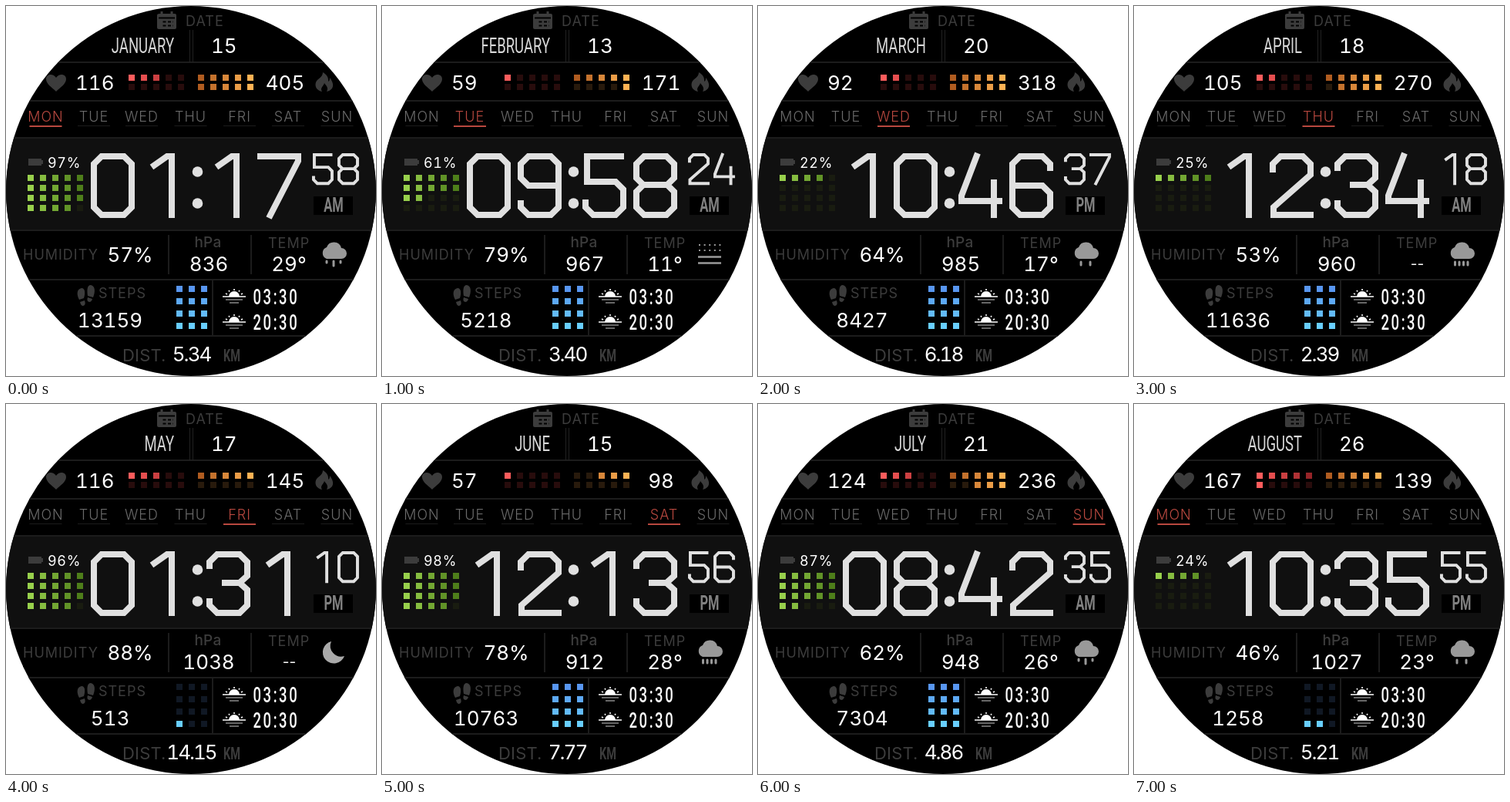
Animation of 480 by 480 pixels, one loop 8000 ms. Source, as an HTML page:

```html
<!DOCTYPE html>
<html lang="en">
<head>
<meta charset="utf-8">
<title>Watch face</title>
<style>
html, body { margin: 0; width: 100%; height: 100%; overflow: hidden; background: #fff; }
svg { display: block; width: 480px; height: 480px; }
text { font-family: Inter, "Open Sans", sans-serif; }
.num { font-size: 26px; fill: #fff; font-feature-settings: "tnum"; }
.mid { text-anchor: middle; }
.dist { letter-spacing: -2px; }
.small { font-size: 18px; letter-spacing: .7px; }
.none { font-size: 19px; font-feature-settings: normal; }
.label { font-size: 18px; letter-spacing: 1px; fill: #3c3c3c; }
.day { fill: #6a6a6a; font-weight: 300; }
.narrow { font-family: Roboto, sans-serif; font-size: 28px; fill: #d8d8d8; }
.end { text-anchor: end; }
.clock { letter-spacing: 3.9px; font-weight: 500; fill: #fff; }
.unit { font-weight: 700; }
.digit { fill: none; stroke: #e0e0e0; stroke-width: 8; stroke-linejoin: miter; }
</style>
</head>
<body>
<svg viewBox="0 0 480 480">
  <defs>
    <clipPath id="round"><circle cx="240" cy="240" r="240" shape-rendering="crispEdges"/></clipPath>
    <g id="sun">
      <path d="M-7 0A7 7 0 0 1 7 0Z" fill="#fff"/>
      <path d="M-15 0H15M0-10V-8M-7-8L-6-6.5M7-8L6-6.5M-11-4L-9-3M11-4L9-3" stroke="#fff" stroke-width="1.6"/>
      <path d="M-11 4H11M-6 8H6" stroke="#888" stroke-width="1.6"/>
    </g>
    <path id="cloud" d="M416 328a8 8 0 0 1 0-15a10 10 0 0 1 19 1a7 7 0 0 1 0 14Z" fill="#999"/>
  </defs>
  <g clip-path="url(#round)">
    <rect width="480" height="480"/>
    <rect y="171" width="480" height="120" fill="#101010"/>
    <path d="M0 73H480M0 123H480M0 171H480M0 291H480M0 355H480M0 428H480M211 297V348M318 297V348M268 355V428" stroke="#1c1c1c" stroke-width="2"/>
    <path d="M238.500 31V73M242.500 31V73" stroke="#222"/>
    <g fill="#3c3c3c">
      <path d="M199 10H219Q221 10 221 12V28Q221 30 219 30H198Q196 30 196 28V12Q196 10 199 10Z"/>
      <path d="M202 7V12M215 7V12" stroke="#3c3c3c" stroke-width="3"/>
      <path d="M198 15.500H219M201 20.500H217M201 25.500H217" stroke="#000" stroke-width="2"/>
      <path d="M201 20.500H217M201 25.500H217" stroke="#3c3c3c" stroke-width="3" stroke-dasharray="2.500 4"/>
      <path d="M65 111C60 106 52 101 52 95C52 88 61 87 65 93C69 87 78 88 78 95C78 101 70 106 65 111Z"/>
      <path d="M411 86C419 91 418 95 418 98C420 97 420 95 420 93C424 98 426 104 422 108Q419 111 416 111C419 106 415 103 413 100C412 104 407 106 410 111C404 110 400 105 402 99C404 94 411 93 411 86Z"/>
      <path d="M29 198H46V200H48V205H46V207H29Z"/>
      <path transform="translate(207 0) scale(-1 1)" d="M97 362C102 362 102 369 101 376L94 378C91 371 91 363 97 362ZM95 380L101 378Q103 383 99 384Q96 384 95 380ZM109 366C115 367 116 374 112 381L106 379C104 373 104 366 109 366ZM105 382L111 384Q110 389 107 389Q103 388 105 382Z"/>
    </g>
    <circle cx="248.500" cy="215" r="6.800" fill="#e0e0e0"/>
    <circle cx="248.500" cy="256" r="6.800" fill="#e0e0e0"/>
    <rect x="399" y="247" width="51" height="24"/>
    <use href="#sun" x="296" y="377"/>
    <use href="#sun" x="296" y="410"/>
    <g id="face"></g>
  </g>
</svg>
<script>
const STEP = 1000;
const DAYS = ["MON", "TUE", "WED", "THU", "FRI", "SAT", "SUN"];
const DAY_X = [51.5, 114, 176, 239.5, 303, 366, 429.5];

// month, date, pulse, pulse dots, kcal, battery, time, seconds, half,
// humidity, pressure, temperature, weather, steps, distance
const STATES = [
  ["JANUARY", 15, 116, 3, 405, 97, "0117", "58", "AM", 57, 836, "29°", "showers", 13159, "5.34"],
  ["FEBRUARY", 13, 59, 1, 171, 61, "0958", "24", "AM", 79, 967, "11°", "fog", 5218, "3.40"],
  ["MARCH", 20, 92, 2, 318, 22, "1046", "37", "PM", 64, 985, "17°", "drizzle", 8427, "6.18"],
  ["APRIL", 18, 105, 2, 270, 25, "1234", "18", "AM", 53, 960, "--", "rain", 11636, "2.39"],
  ["MAY", 17, 116, 3, 145, 96, "0131", "10", "PM", 88, 1038, "--", "moon", 513, "14.15"],
  ["JUNE", 15, 57, 1, 98, 98, "1213", "56", "PM", 78, 912, "28°", "rain", 10763, "7.77"],
  ["JULY", 21, 124, 3, 236, 87, "0842", "35", "AM", 62, 948, "26°", "showers", 7304, "4.86"],
  ["AUGUST", 26, 167, 6, 139, 24, "1035", "55", "PM", 46, 1027, "23°", "drizzle", 1258, "5.21"]
];

// strokes of each numeral in a 57 x 84 cell
const GLYPHS = [
  "M14 4H43L53 14V70L43 80H14L4 70V14Z",
  "M13 18L33 4H39V84",
  "M4 25V14L14 4H43L53 14V28L5 70V80H57",
  "M4 23V14L14 4H43L53 14V32L43 41L53 50V70L43 80H14L4 70V61M43 41H20",
  "M25 0L4 55V62H57M46 34V84",
  "M54 4H6V37H43L53 47V70L43 80H14L4 70V60",
  "M53 23V14L43 4H14L4 14V70L14 80H43L53 70V52L43 42H4",
  "M0 4H53V10L15 84",
  "M14 4H43L53 14V32L44 41L53 50V70L43 80H14L4 70V50L13 41L4 32V14ZM13 41H44",
  "M53 42H14L4 32V14L14 4H43L53 14V70L43 80H14L4 70V61"
];

const drops = d => `<use href="#cloud"/><path d="${d}" stroke="#999" stroke-width="3" stroke-linecap="round"/>`;
const WEATHER = {
  showers: drops("M416 331V333M425 331V337M434 331V333"),
  drizzle: drops("M419 332V336M431 332V336"),
  rain: drops("M416.500 332V336M422 332V336M427.500 332V336M433 332V336"),
  fog: `<path d="M411 310H440M411 317H440" stroke="#999" stroke-width="2" stroke-dasharray="2 4.600"/>
    <path d="M410 325.500H440M410 333.500H440" stroke="#999" stroke-width="2.500"/>`,
  moon: `<path d="M422 308A14.500 14.500 0 1 0 439 327A14 14 0 0 1 422 308Z" fill="#aaa"/>`
};

const text = (x, y, s, cls) => `<text x="${x}" y="${y}" class="${cls}">${s}</text>`;
const num = (x, y, s, cls = "mid") => text(x, y, s, "num " + cls);
const narrow = (x, y, s, cls, style = "") =>
  `<text transform="translate(${x} ${y}) scale(.66 1)" class="narrow ${cls}" style="${style}">${s}</text>`;
const digit = (x, n, k = 1) =>
  `<path class="digit" transform="translate(${x} 191) scale(${k})" d="${GLYPHS[n]}"/>`;

function mix(a, b, t) {
  return `rgb(${a.map((v, i) => Math.round(v + (b[i] - v) * t))})`;
}

function dots(x, y, cols, rows, dy, off, color, lit) {
  let out = "";
  for (let r = 0; r < rows; r++)
    for (let c = 0; c < cols; c++)
      out += `<rect x="${x + c * 16}" y="${y + r * dy}" width="8" height="8" fill="${lit(c, r) ? color(c, r) : off}"/>`;
  return out;
}

function week(active) {
  return DAYS.map((d, i) => {
    const on = i === active, x = DAY_X[i];
    return `<text x="${x}" y="150" class="label day mid"${on ? ' style="fill:#b8483f"' : ""}>${d}</text>
      <rect x="${x - 21}" y="155" width="42" height="${on ? 2 : 1}" fill="${on ? "#b8483f" : "#1c1c1c"}"/>`;
  }).join("");
}

const LABELS = text(233, 26, "DATE", "label") + text(22, 329, "HUMIDITY", "label") +
  text(340, 314, "TEMP", "label") + text(120, 379, "STEPS", "label") +
  `<text x="262" y="313" class="label mid" style="font-size:19px;font-weight:500;letter-spacing:.3px">hPa</text>` +
  `<text x="151" y="461" class="label" style="font-size:22px;letter-spacing:.2px">DIST.</text>` +
  narrow(282, 461, "KM", "unit", "font-size:22px;fill:#3c3c3c") +
  narrow(320.5, 387, "03:30", "clock") + narrow(320.5, 420, "20:30", "clock");

function draw(i) {
  const [month, date, pulse, beats, kcal, battery, time, sec, half,
    humidity, pressure, temp, weather, steps, dist] = STATES[i];
  const burn = Math.round(kcal / 30), walked = Math.floor(steps / 430), charge = Math.floor(battery / 5);
  return LABELS + week(i % 7) +
    narrow(218, 61, month, "end") + num(266, 61, date, "") +
    num(90, 109, pulse, "") + num(362, 109, kcal) +
    dots(159, 89, 5, 2, 12, "#280c0c", c => mix([255, 92, 92], [150, 36, 40], c / 4),
      (c, r) => r * 5 + c < beats) +
    dots(249, 89, 5, 2, 12, "#281a0c", c => mix([176, 92, 32], [255, 178, 84], c / 4),
      (c, r) => r * 5 + 4 - c < burn) +
    dots(28, 219, 5, 4, 13, "#191c10", c => mix([152, 208, 76], [78, 126, 26], c / 4),
      (c, r) => r * 5 + c < charge) +
    dots(221, 363, 3, 4, 16, "#101824", (c, r) => mix([88, 150, 240], [104, 206, 255], r / 3),
      (c, r) => (3 - r) * 3 + c < walked) +
    text(54, 210, battery + "%", "num small") +
    [110, 176, 260, 326].map((x, k) => digit(x, time[k])).join("") +
    digit(397, sec[0], .49) + digit(430, sec[1], .49) +
    narrow(425, 267, half, "unit mid", "font-size:25px;fill:#808080") +
    num(161, 332, humidity + "%") + num(263, 344, pressure) +
    (temp === "--" ? num(367.5, 341, temp, "mid none") : num(367, 344, temp)) +
    WEATHER[weather] + num(135, 417, steps) + num(240.5, 461, dist, "mid dist");
}

const face = document.getElementById("face");
let shown = -1;
function tick() {
  const i = Math.floor(performance.now() / STEP) % STATES.length;
  if (i !== shown) face.innerHTML = draw(shown = i);
  requestAnimationFrame(tick);
}
tick();
</script>
</body>
</html>
```
